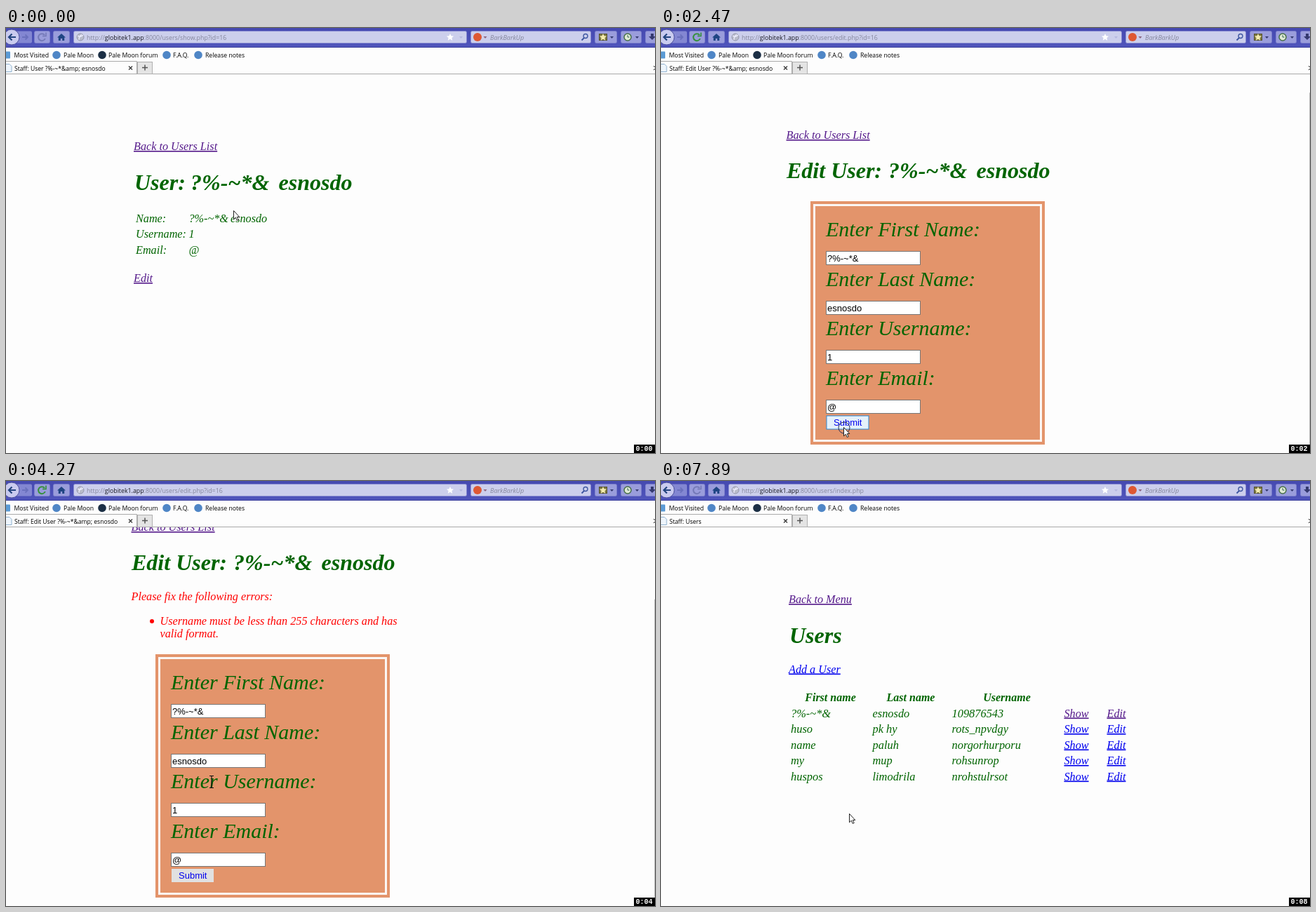
Recreate the animation shown at these times as an HTML page. Size 925 px wide and 606 px high, loop 8 s.

```html
<!DOCTYPE html>
<html lang="en">
<head>
<meta charset="utf-8">
<title>Staff: Users</title>
<style>
html, body { margin: 0; width: 100%; height: 100%; overflow: hidden; background: #fdfdfd; }
svg { display: block; width: 925px; height: 606px; }
text { white-space: pre; }
.page text { font: italic 16.2px "Liberation Serif", serif; fill: #006400; }
.page .h1 { font-size: 32px; font-weight: bold; }
.page .th { font-size: 16px; font-weight: bold; text-anchor: middle; }
.page .td { font-size: 16.4px; }
.page .label { font-size: 30px; }
.page .err { fill: #f00; }
.page .seen, .page .link { text-decoration: underline; text-decoration-skip-ink: none; }
.page .seen { fill: #551a8b; }
.page .link { fill: #00e; }
.page .field { font: 13px "Liberation Sans", sans-serif; fill: #000; }
.page .digits { letter-spacing: -.2px; }
.page .btn { font: 13px "Liberation Sans", sans-serif; fill: #00e; }
.ui text { font: 8.7px "Open Sans", sans-serif; fill: #000; }
.ui .url { font-size: 8.82px; fill: #84869c; }
.ui .tab { font-size: 8.6px; }
.ui .hint { font-size: 9px; font-style: italic; fill: #84869c; }
.ui .clock { font: bold 10px "Liberation Mono", monospace; fill: #fff; }
</style>
</head>
<body>
<svg id="stage" viewBox="0 0 925 606" xmlns="http://www.w3.org/2000/svg"></svg>
<script>
const FIRST = '?%-~*&', LAST = 'esnosdo', USER = '109876543';

const esc = s => s.replace(/&/g, '&amp;').replace(/</g, '&lt;');
const text = (x, y, s, cls = '', id = '') =>
  `<text x="${x}" y="${y}" class="${cls}" id="${id}">${esc(s)}</text>`;
const rect = (x, y, w, h, fill, more = '') =>
  `<rect x="${x}" y="${y}" width="${w}" height="${h}" fill="${fill}" ${more}/>`;
const path = (d, fill, more = '') => `<path d="${d}" fill="${fill}" ${more}/>`;
const dot = (x, y, r, fill, more = '') =>
  `<circle cx="${x}" cy="${y}" r="${r}" fill="${fill}" ${more}/>`;
const group = (id, body, more = '') => `<g id="${id}" ${more}>${body}</g>`;
const line = (d, color, w = 1) => path(d, 'none', `stroke="${color}" stroke-width="${w}"`);

function showPage() {
  const rows = [['Name:', FIRST], ['Username:', '1'], ['Email:', '@']];
  return text(182, 174, 'Back to Users List', 'seen') +
    text(183, 231, 'User:', 'h1') + text(263, 231, FIRST, 'h1') + text(388.5, 231, LAST, 'h1') +
    rows.map(([k, v], i) => text(185, 276.5 + i * 22.7, k) + text(260.5, 276.5 + i * 22.7, v)).join('') +
    text(320, 276.5, LAST) + text(182, 362, 'Edit', 'seen');
}

function formBox() {
  const items = [['First Name', FIRST], ['Last Name', LAST], ['Username', '1'], ['Email', '@']];
  const fields = items.map(([name, value], i) => {
    const y = Math.round(333 + i * 70.7), user = i === 2;
    return text(235, y - 21, `Enter ${name}:`, 'label') +
      rect(235.5, y + .5, 134, 19, '#fff', `stroke="#777" id="${user ? 'userBox' : ''}"`) +
      text(237, y + 14.5, value, user ? 'field digits' : 'field', user ? 'userText' : '');
  }).join('');
  return rect(213, 262, 334, 347, '#e3946b') +
    rect(218.5, 267.5, 323, 336, 'none', 'stroke="#fbf6f4" stroke-width="3"') + fields +
    rect(244, 476, 1, 16, '#000', 'id="caret"') +
    rect(236, 568, 60, 19, '#fff', 'id="btn"') + text(246, 582, 'Submit', 'btn');
}

function editPage() {
  const errors = text(178.5, 272, 'Please fix the following errors:', 'err') +
    dot(208, 302, 3, '#f00') +
    text(219.5, 306.5, 'Username must be less than 255 characters and has', 'err') +
    text(219.5, 325, 'valid format.', 'err');
  return text(178.5, 173, 'Back to Users List', 'seen') +
    text(179, 229, 'Edit User:', 'h1') + text(324, 229, FIRST, 'h1') + text(449.5, 229, LAST, 'h1') +
    group('errors', errors) + group('form', formBox());
}

function indexPage() {
  const rows = [
    [FIRST, LAST, USER],
    ['huso', 'pk hy', 'rots_npvdgy'],
    ['name', 'paluh', 'norgorhurporu'],
    ['my', 'mup', 'rohsunrop'],
    ['huspos', 'limodrila', 'nrohstulrsot']
  ];
  const body = rows.map((row, i) => {
    const y = 336.5 + i * 22.5, link = i ? 'link' : 'seen';
    return row.map((s, k) => text([185, 301.5, 414.5][k], y, s, 'td')).join('') +
      text(574.5, y, 'Show', link) + text(635.5, y, 'Edit', link);
  }).join('');
  return text(182, 174, 'Back to Menu', 'seen') + text(183, 231, 'Users', 'h1') +
    text(182, 273.5, 'Add a User', 'link') + text(241.5, 314, 'First name', 'th') +
    text(356, 314, 'Last name', 'th') + text(493, 314, 'Username', 'th') + body;
}

function chrome() {
  const button = (x, w) => rect(x + .5, 4.5, w - 1, 17, '#9a9ddb', 'rx="2" stroke="#7c80cd"');
  const down = (x, c) => path(`M${x} 12h5l-2.5 3z`, c);
  const star = (x, y, c) =>
    path(`M${x} ${y - 5}l1.5 3.3 3.6.4-2.7 2.4.8 3.6-3.2-1.9-3.2 1.9.8-3.6-2.7-2.4 3.6-.4z`, c);
  const bar = rect(0, 0, 925, 28, 'url(#bar)') + rect(0, 27, 925, 1, '#3a3f9c') +
    rect(12, 4.5, 25, 17, '#8387d2', 'rx="2"') +
    dot(8, 13, 11, '#c9cbef', 'stroke="#4a4e9c"') +
    line('M14 13H4M8.5 8.5L4 13l4.5 4.5', '#23457f', 2.2) +
    line('M23 13h8M27.5 9.5L31 13l-3.5 3.5', '#6a70bd', 1.8) +
    button(40, 23) +
    group('reload', path('M55 10a5 5 0 1 0 .8 5', 'none', 'stroke-width="2"') +
      path('M52 11.5h5v-5', 'none', 'stroke-width="1.6"')) +
    button(67, 24) +
    path('M73 13.5l6-5.5 6 5.5h-1.8v4.5h-3v-3h-2.4v3h-3v-4.5z', '#1f4583');
  const address = rect(96.5, 4.5, 560, 17, '#cccfec', 'rx="2" stroke="#8b8fd2"') +
    dot(106, 13, 5, '#b9bccb', 'stroke="#9497ab"') +
    line('M102 11q4 3 8-1M104 17q0-5 4-8', '#eef', 1.2) +
    `<text x="115" y="16.5" class="url">http://<tspan fill="#191923">globitek1.app</tspan><tspan id="url"></tspan></text>` +
    star(633, 13, '#fff') + down(646, '#b5b8df');
  const search = rect(662.5, 4.5, 171, 17, '#cccfec', 'rx="2" stroke="#8b8fd2"') +
    dot(672, 13, 6, '#de5833') + down(680.5, '#8d6580') +
    text(690, 16.5, 'BarkBarkUp', 'hint') +
    dot(826, 11.5, 3, 'none', 'stroke="#3c55a0" stroke-width="1.3"') + line('M824 14l-3.5 3.5', '#3c55a0', 1.8);
  const tools = button(839, 32) + rect(845.5, 8.5, 11, 9, '#7b7742', 'stroke="#55532f"') +
    star(851, 13, '#f5edb0') + down(861, '#34396f') +
    button(876, 30) + dot(886, 13, 5, '#dfe9d4', 'stroke="#477047" stroke-width="1.5"') +
    line('M886 10v3h2.5', '#365') + down(897, '#34396f') +
    button(911, 20) + path('M919 8h4v4h3l-5 5-5-5h3z', '#34396f');
  const marks = rect(-3, 33.5, 9, 10, '#5b9bd5', 'rx="1"') + text(11.5, 42, 'Most Visited') +
    [[72, 82, 'Pale Moon', '#4f86c6'], [137, 146, 'Pale Moon forum', '#1c2f45'],
     [229, 238, 'F.A.Q.', '#4f86c6'], [274, 284, 'Release notes', '#4f86c6']]
      .map(([cx, x, s, c]) => dot(cx, 38.5, 5.8, c) + text(x, 42, s)).join('');
  const tabs = line('M0 47.5H186.5V65.5H925', '#a9a9a9') + line('M0 65.5H187', '#a9a9a9') +
    rect(187.5, 48.5, 21, 17, '#e4e4e4', 'stroke="#b0b0b0"') +
    line('M194 56.5h8M198 52.5v8', '#555', 1.5) +
    path('M-2 51.5h7l3 3v8h-10z', '#eef5fc', 'stroke="#8fb1cf"') +
    text(12, 60.5, '', 'tab', 'tab') + line('M175 54.5l5 5M180 54.5l-5 5', '#333', 1.2) +
    line('M923 54l3 3-3 3', '#222');
  return rect(0, 28, 925, 38, '#fdfdfd') + bar + address + search + tools + marks + tabs;
}

const stage = document.getElementById('stage');
stage.innerHTML =
  '<defs><linearGradient id="bar" x2="0" y2="1"><stop stop-color="#4549b0"/><stop offset="1" stop-color="#5055bc"/></linearGradient></defs>' +
  rect(0, 0, 925, 606, '#fdfdfd') +
  group('show', showPage(), 'class="page"') +
  group('edit', editPage(), 'class="page"') +
  group('index', indexPage(), 'class="page"') +
  rect(924, 79, 1, 500, '#bdbdbd', 'id="thumb"') +
  group('ui', chrome() + rect(895, 594, 30, 12, '#000') + text(897.5, 603, '', 'clock', 'clock'), 'class="ui"') +
  dot(0, 0, 8, 'none', 'stroke="#26305c" id="ring"') +
  group('arrow', path('M.5.5V12.8L3.3 10.2 5.3 14.5 7.2 13.6 5.3 9.5H8.8Z', '#fff', 'stroke="#222"')) +
  group('beam', line('M-3-8.5h2.5l.5.5.5-.5h2.5M0-8V8M-3 8.5h2.5l.5-.5.5.5h2.5', '#111', 1.2));

const $ = {};
stage.querySelectorAll('[id]').forEach(el => { if (el.id) $[el.id] = el; });
const show = (id, on) => $[id].setAttribute('display', on ? 'inline' : 'none');
const move = (id, x, y) => $[id].setAttribute('transform', `translate(${x} ${y})`);
const within = (t, a, b) => t >= a && t < b;
const ease = (t, a, b) => {
  const u = Math.min(1, Math.max(0, (t - a) / (b - a)));
  return u * u * (3 - 2 * u);
};
const passed = (t, times) => times.filter(v => t >= v).length;

// pointer moves: start, end, x, y
const MOVES = [
  [150, 650, 199, 364], [1240, 1360, 326, 398], [1800, 2150, 260, 569], [2890, 3380, 366, 327],
  [3630, 3900, 345, 388], [4000, 4270, 293, 429], [4430, 4650, 268, 474]
];
const CLICKS = [[660, 800], [2400, 2610], [4750, 4900]];
const KEYS = [5550, 5700, 5970, 6120, 6560, 6740, 6900, 7340];
const TICKS = [950, 1940, 2890, 3900, 4990, 5970, 7070, 7890];

function pointer(t) {
  let x = 324, y = 260;
  for (const [a, b, nx, ny] of MOVES) {
    const k = ease(t, a, b);
    x += (nx - x) * k;
    y += (ny - y) * k;
  }
  return [Math.round(x), Math.round(y)];
}

function render(t) {
  const page = t < 830 ? 'show' : t < 7890 ? 'edit' : 'index';
  const failed = t >= 2890, focused = t >= 4800;
  const scroll = Math.round(failed ? 102 * ease(t, 3630, 3900) : 15 * ease(t, 1640, 1800));
  for (const id of ['show', 'edit', 'index']) show(id, id === page);
  show('errors', failed);
  move('edit', 0, -scroll);
  move('form', 0, failed ? 87 : 0);

  show('thumb', page === 'edit');
  $.thumb.setAttribute('y', 79 + scroll * .88);
  $.thumb.setAttribute('height', failed ? 435 : 507);

  const typed = 1 + passed(t, KEYS);
  $.userText.textContent = USER.slice(0, typed);
  $.userBox.setAttribute('stroke', focused ? '#000' : '#777');
  $.caret.setAttribute('x', 237 + 7 * typed);
  show('caret', focused && !within(t, 5110, 5550));

  const hover = within(t, 2080, 2890);
  $.btn.setAttribute('fill', hover ? '#e5f1fb' : t < 1640 ? '#fff' : '#e1e1e1');
  $.btn.setAttribute('stroke', hover ? '#2a8ad8' : 'none');

  $.url.textContent = `:8000/users/${page}.php` + (page === 'index' ? '' : '?id=16');
  const action = page === 'edit' ? 'Edit User' : 'User';
  $.tab.textContent = page === 'index' ? 'Staff: Users' : `Staff: ${action} ${FIRST}amp; ${LAST}`;
  const ready = within(t, 1640, 2890) || within(t, 3250, 7770);
  $.reload.setAttribute('stroke', ready ? '#35913b' : '#757ab8');
  $.clock.textContent = '0:0' + passed(t, TICKS);

  const [x, y] = pointer(t), beam = within(t, 4000, 7890);
  show('arrow', !beam);
  show('beam', beam);
  move('arrow', x, y);
  move('beam', x, y);
  show('ring', CLICKS.some(([a, b]) => within(t, a, b)));
  move('ring', x + 1, y + 1);
}

const start = performance.now();
function loop() {
  render((performance.now() - start) % 8000);
  requestAnimationFrame(loop);
}
loop();
</script>
</body>
</html>
```
